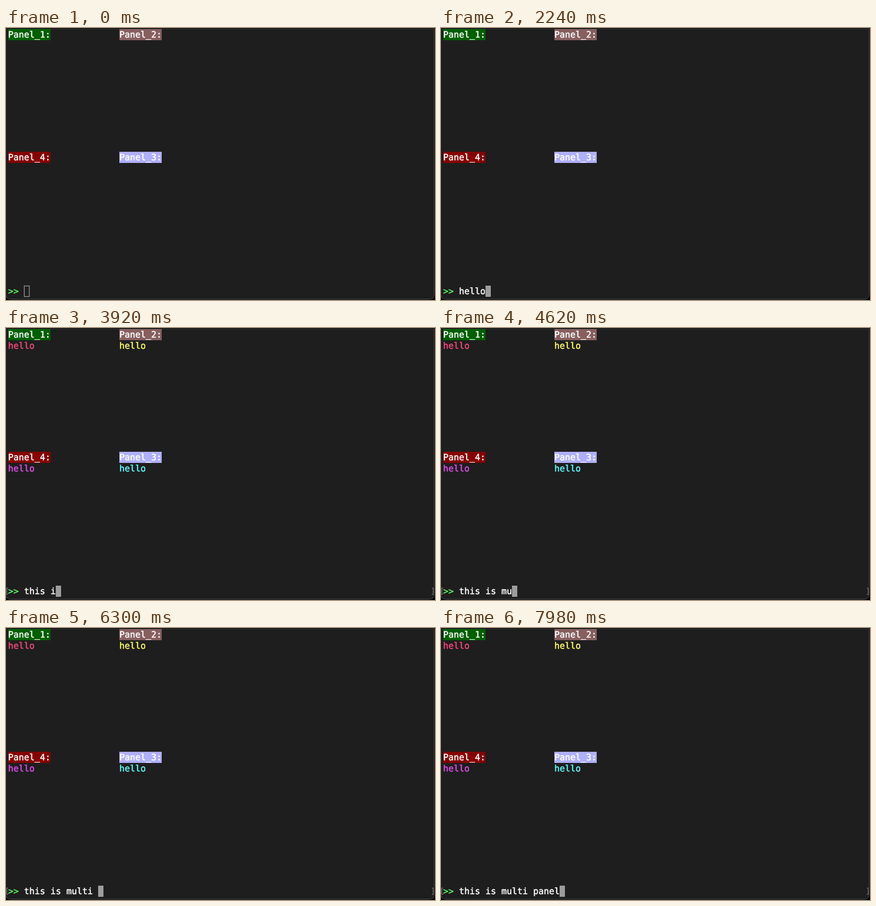
Animation of 810x512 px, one loop 8 s. Source, as an HTML page:

```html
<!DOCTYPE html>
<html lang="en">
<head>
<meta charset="utf-8">
<title>Terminal panels</title>
<style>
html, body { margin: 0; width: 100%; height: 100%; overflow: hidden; background: #060606; }
svg { display: block; }
text {
  font: 16.61px "DejaVu Sans Mono", monospace;
  white-space: pre;
  text-rendering: geometricPrecision;
  stroke-width: .45px;
}
</style>
</head>
<body>
<svg id="stage" width="810" height="512" viewBox="0 0 810 512">
  <path d="M-.5 0H808.5V500.5Q808.5 510.5 798.5 510.5H9.5Q-.5 510.5 -.5 500.5V0" fill="#1e1e1e" stroke="#4c4c4c"/>
  <path d="M0 .5H810" stroke="#080808"/>
  <path d="M0 1.5H808" stroke="#343434"/>
</svg>
<script>
const NS = "http://www.w3.org/2000/svg";
const stage = document.getElementById("stage");
const LOOP = 8000, CELL = 10, ROW = 21, LEFT = 4, TOP = 2;
const PROMPT_ROW = 23, ENTER = 2800, FOCUS = 70;

function add(tag, attrs, text = "") {
  const el = document.createElementNS(NS, tag);
  for (const key in attrs) el.setAttribute(key, attrs[key]);
  el.textContent = text;
  stage.append(el);
  return el;
}

const colX = col => LEFT + col * CELL;
const rowY = row => TOP + row * ROW;
const write = (col, row, color, text) =>
  add("text", { x: colX(col), y: rowY(row) + 16, fill: color, stroke: color }, text);

// number, column, row, title background, message colour
const panels = [
  [1, 0, 0, "#005f00", "#f2497a"],
  [2, 21, 0, "#875f5f", "#fffc67"],
  [4, 0, 11, "#870000", "#e04cea"],
  [3, 21, 11, "#afafff", "#60fdff"]
];
const replies = panels.map(([n, col, row, back, color]) => {
  add("rect", { x: colX(col), y: rowY(row), width: 8 * CELL, height: ROW, fill: back });
  write(col, row, "#fff", `Panel_${n}:`);
  return write(col, row + 1, color, "hello");
});

const marks = add("path", {
  d: "M4 489.5H1.5V501.5H4M804 489.5H806.5V501.5H804",
  fill: "none", stroke: "#8a8a8a"
});
write(0, PROMPT_ROW, "#5ffa68", ">>");
const input = write(3, PROMPT_ROW, "#fff", "");
const cursor = add("rect", { y: rowY(PROMPT_ROW), width: CELL, height: ROW, fill: "#9d9d9d" });
const hollow = add("rect", {
  x: 34.5, y: rowY(PROMPT_ROW) + .5, width: CELL - .5, height: ROW - 1,
  fill: "none", stroke: "#9d9d9d", "stroke-width": 1.3
});

// each line is typed one key at a time
const first = { text: "hello", keys: [1470, 1750, 1890, 2100, 2240] };
const second = {
  text: "this is multi panel",
  keys: [3080, 3150, 3290, 3570, 3710, 3920, 4060, 4200, 4410, 4620,
    4900, 5040, 5250, 6300, 6650, 7280, 7770, 7840, 7980]
};

const show = (el, on) => el.setAttribute("visibility", on ? "visible" : "hidden");

function draw(t) {
  const sent = t >= ENTER;
  const line = sent ? second : first;
  const count = line.keys.filter(k => k <= t).length;
  input.textContent = line.text.slice(0, count);
  cursor.setAttribute("x", colX(3 + count));
  show(cursor, t >= FOCUS);
  show(hollow, t < FOCUS);
  show(marks, sent);
  replies.forEach(el => show(el, sent));
}

const start = performance.now();
function tick() {
  draw((performance.now() - start) % LOOP);
  requestAnimationFrame(tick);
}
tick();
</script>
</body>
</html>
```
